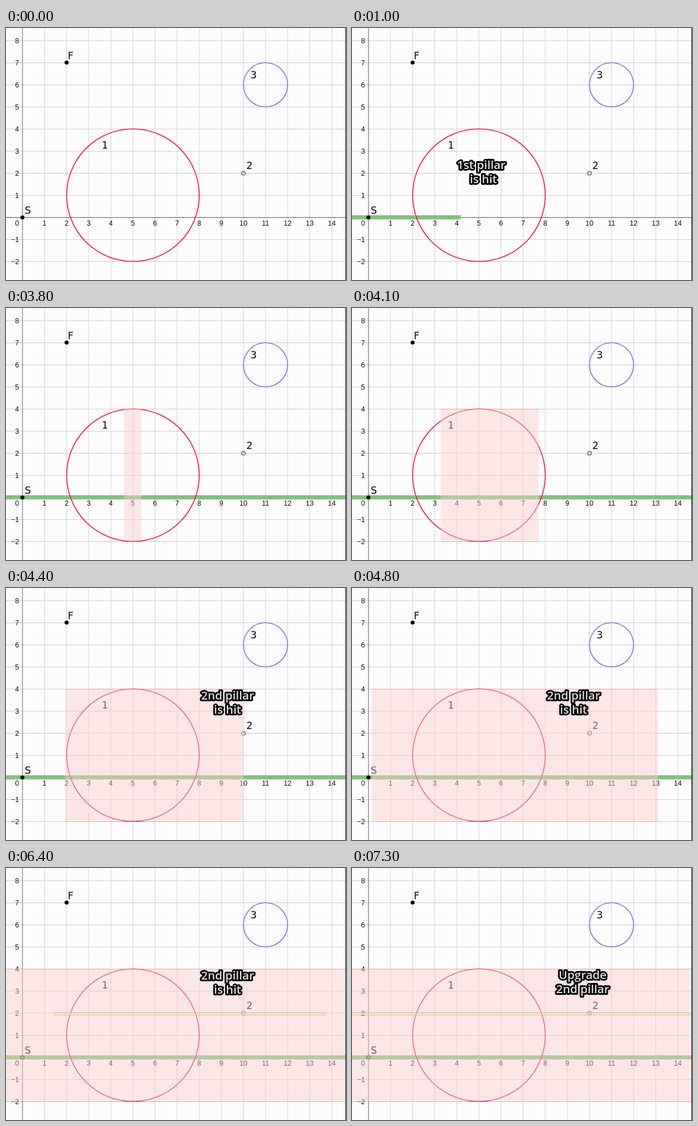
Write an HTML page with a canvas that moves like this. It is 600 px wide and 445 px high and loops after 8 s.

```html
<!DOCTYPE html>
<html lang="en">
<head>
<meta charset="utf-8">
<title>Pillars</title>
<style>
html, body { margin: 0; width: 100%; height: 100%; overflow: hidden; background: #fcfcfc; }
canvas { display: block; width: 600px; height: 445px; }
</style>
</head>
<body>
<canvas id="stage"></canvas>
<script>
const W = 600, H = 445, UNIT = 39, LOOP = 8000, STEP = 100;
const canvas = document.getElementById('stage');
const ctx = canvas.getContext('2d');
const dpr = window.devicePixelRatio || 1;
canvas.width = W * dpr;
canvas.height = H * dpr;

// Graph units to pixels
const px = x => 29 + x * UNIT;
const py = y => 334 - y * UNIT;

const clamp01 = v => Math.max(0, Math.min(1, v));
const lerp = (a, b, p) => a + (b - a) * p;
const progress = (t, from, to) => clamp01((t - from) / (to - from));

const captions = [
  { from: 800, to: 2400, lines: [['1st pillar', 228, 249], ['is hit', 232, 274]] },
  { from: 4400, to: 6700, lines: [['2nd pillar', 391, 197], ['is hit', 391, 222]] },
  { from: 7300, to: LOOP, lines: [['Upgrade', 407, 196], ['2nd pillar', 407, 221]] }
];

function rect(x, y, w, h, color) {
  ctx.fillStyle = color;
  ctx.fillRect(x, y, w, h);
}

function text(str, x, y, font, align, color) {
  ctx.font = font;
  ctx.textAlign = align;
  ctx.fillStyle = color;
  ctx.fillText(str, x, y);
}

function circle(x, y, r, stroke, width, fill) {
  ctx.beginPath();
  ctx.arc(x, y, r, 0, Math.PI * 2);
  if (fill) {
    ctx.fillStyle = fill;
    ctx.fill();
  }
  if (stroke) {
    ctx.strokeStyle = stroke;
    ctx.lineWidth = width;
    ctx.stroke();
  }
}

function drawGrid() {
  rect(0, 0, W, H, '#fcfcfc');
  for (let i = 1; i <= 14; i++) rect(px(i) - 0.5, 0, 1, H, '#d2d2d2');
  for (let j = -2; j <= 8; j++) rect(0, py(j), W, 1, '#cccccc');
  rect(px(0) - 0.5, 0, 1.2, H, '#777');
  rect(0, py(0), W, 1.2, '#666');
}

function drawNumbers() {
  const font = '12.5px "Liberation Sans", Arial, sans-serif';
  const color = '#111';
  for (let i = 1; i <= 14; i++) text(String(i), px(i), 349, font, 'center', color);
  for (let j = -2; j <= 8; j++) {
    if (j) text(String(j).replace('-', '\u2212'), 23, py(j) + 4.5, font, 'right', color);
  }
  text('0', 23, 349, font, 'right', color);
}

function drawFigures() {
  circle(px(5), py(1) + 0.3, 3 * UNIT, '#f8104a', 1.6);
  circle(px(11), py(6) + 0.3, UNIT, '#7474fa', 1.6);
  circle(px(2), py(7), 3.6, null, 0, '#000');
  circle(px(0), py(0) + 0.5, 3.6, null, 0, '#000');
  circle(px(10), py(2) + 0.5, 3.5, '#76584a', 1.2, '#f5c8a8');
  const font = '17.5px "DejaVu Sans", Verdana, sans-serif';
  const labels = [['S', 33, 327.5], ['F', 109, 54.5], ['1', 169, 212.5], ['2', 424, 248.5], ['3', 431.5, 88.5]];
  for (const [str, x, y] of labels) text(str, x, y, font, 'left', '#0a0a0a');
}

function drawGreenWave(t) {
  if (t < 500) return;
  const reach = 14 + (t - 500) * 0.2975;
  const left = Math.max(0, px(0) - reach);
  const width = Math.min(W, px(0) + reach) - left;
  rect(left, 331, width, 7, '#8ac884');
  rect(left, 331, width, 1, '#64a070');
  rect(left, 334, width, 1, '#74b372');
  rect(left, 337, width, 1, '#7ab878');
}

function drawRedWave(t) {
  if (t < 3800) return;
  const p = progress(t, 3800, 5000);
  const left = lerp(208.5, 0, p);
  const width = lerp(239, W, p) - left;
  rect(left, 178, width, 233, 'rgba(251,205,203,0.46)');
  rect(left, 178, width, 1, 'rgba(200,120,120,0.4)');
  rect(left, 412, width, 1, 'rgba(200,120,120,0.4)');
  // The start point turns olive once the wave has passed it
  if (left <= px(0)) circle(px(0), py(0) + 0.5, 3.2, '#85805a', 1.2, '#a9b98a');
}

function drawYellowWave(t) {
  if (t < 5700) return;
  const left = lerp(391, 0, progress(t, 5700, 6590));
  const width = lerp(439, W, progress(t, 5700, 6600)) - left;
  rect(left, 255, width, 5, 'rgba(245,236,195,0.4)');
  rect(left, 255, width, 1, 'rgba(186,168,100,0.6)');
  rect(left, 259, width, 1, 'rgba(186,168,100,0.6)');
}

function drawCaptions(t) {
  for (const { from, to, lines } of captions) {
    if (t < from || t >= to) continue;
    ctx.font = '600 20.5px "Open Sans", "Noto Sans", sans-serif';
    ctx.textAlign = 'center';
    ctx.lineJoin = 'round';
    ctx.strokeStyle = '#000';
    ctx.lineWidth = 6;
    for (const [str, x, y] of lines) ctx.strokeText(str, x, y);
    ctx.fillStyle = '#dedede';
    for (const [str, x, y] of lines) ctx.fillText(str, x, y);
  }
}

function draw(now) {
  const t = Math.floor((now % LOOP) / STEP) * STEP;
  ctx.setTransform(dpr, 0, 0, dpr, 0, 0);
  drawGrid();
  drawGreenWave(t);
  drawNumbers();
  drawFigures();
  drawRedWave(t);
  drawYellowWave(t);
  drawCaptions(t);
  rect(W - 1, 0, 1, H, '#111');
}

let start = null;
function tick(now) {
  if (start === null) start = now;
  draw(now - start);
  requestAnimationFrame(tick);
}
draw(0);
requestAnimationFrame(tick);
</script>
</body>
</html>
```
